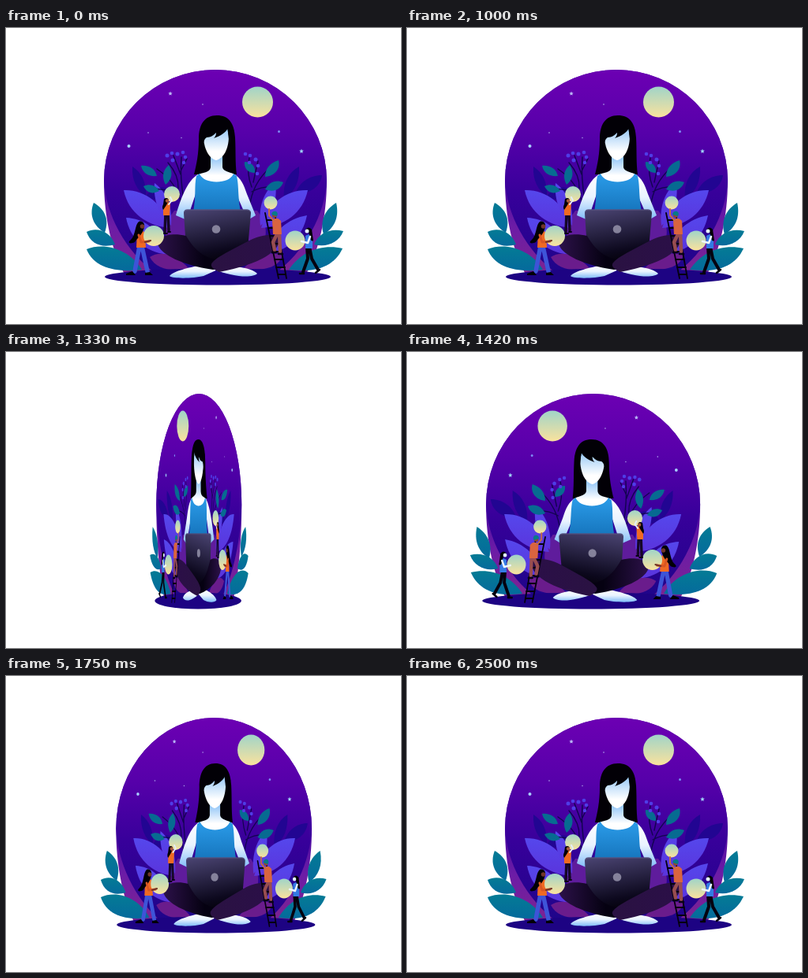
An HTML page that plays this animation: 500 by 376 pixels, repeating every 2580 ms.

```html
<!DOCTYPE html>
<html lang="en">
<head>
<meta charset="utf-8">
<title>Evening work</title>
<style>
  html, body { margin: 0; width: 100%; height: 100%; overflow: hidden; background: #fff; }
  svg { display: block; width: 100vw; height: 100vh; }
  .line { fill: none; stroke-linecap: round; stroke-linejoin: round; }
  .glow { fill: url(#moon); }
  .ink { fill: #020006; }
  .teal { fill: url(#teal); }
  .violet { fill: url(#violet); }
  .skin { fill: url(#skin); }
</style>
</head>
<body>
<svg viewBox="0 0 500 376">
  <defs>
    <linearGradient id="sky" gradientUnits="userSpaceOnUse" x1="0" y1="53" x2="0" y2="316">
      <stop offset="0" stop-color="#6c00b3"/><stop offset=".3" stop-color="#5700aa"/>
      <stop offset=".6" stop-color="#37009a"/><stop offset="1" stop-color="#1d0589"/>
    </linearGradient>
    <linearGradient id="rim" gradientUnits="userSpaceOnUse" x1="0" y1="194" x2="0" y2="310">
      <stop offset="0" stop-color="#4a0aa2"/><stop offset=".5" stop-color="#6c1ca6"/><stop offset="1" stop-color="#7c2392"/>
    </linearGradient>
    <linearGradient id="moon" x2="0" y2="1">
      <stop offset="0" stop-color="#a0d4c8"/><stop offset="1" stop-color="#fae29d"/>
    </linearGradient>
    <linearGradient id="teal" x2="0" y2="1">
      <stop offset="0" stop-color="#047b95"/><stop offset="1" stop-color="#056a9c"/>
    </linearGradient>
    <linearGradient id="violet" x2="0" y2="1">
      <stop offset="0" stop-color="#5547ec"/><stop offset="1" stop-color="#5a34dc"/>
    </linearGradient>
    <linearGradient id="skin" x2="0" y2="1">
      <stop offset="0" stop-color="#fff"/><stop offset=".5" stop-color="#e9f3ff"/><stop offset="1" stop-color="#7fbcf8"/>
    </linearGradient>
    <linearGradient id="neck" x2="0" y2="1">
      <stop offset=".1" stop-color="#8fc4f7"/><stop offset=".7" stop-color="#fff"/>
    </linearGradient>
    <linearGradient id="face" x2="0" y2="1">
      <stop offset="0" stop-color="#86bff5"/><stop offset=".75" stop-color="#fff"/>
    </linearGradient>
    <linearGradient id="top" x2="0" y2="1">
      <stop offset="0" stop-color="#2b9ce9"/><stop offset="1" stop-color="#1675bd"/>
    </linearGradient>
    <linearGradient id="case" x1=".2" x2=".4" y2="1">
      <stop offset="0" stop-color="#48426f"/><stop offset=".75" stop-color="#0c081d"/><stop offset="1" stop-color="#020006"/>
    </linearGradient>
    <linearGradient id="legL"><stop offset="0" stop-color="#2c1149"/><stop offset=".7" stop-color="#050111"/></linearGradient>
    <linearGradient id="legR"><stop offset="0" stop-color="#2a1242"/><stop offset="1" stop-color="#2b0f48"/></linearGradient>
    <clipPath id="ground"><path d="M90 40H440V315H90Z"/></clipPath>
  </defs>

  <g id="scene">
    <!-- sky -->
    <g clip-path="url(#ground)">
      <path d="M124 194A141 141 0 0 1 406 194C406 240 396 285 378 316H152C134 285 124 240 124 194Z" fill="url(#rim)"/>
      <path d="M124 194A141 141 0 0 1 406 194C404 235 380 285 335 316H195C150 285 126 235 124 194Z" fill="url(#sky)"/>
    </g>
    <circle class="glow" cx="318.500" cy="94" r="19.500"/>
    <g fill="#b9b6f5">
      <path d="M208 80.500l.8 1.700 1.800.2-1.300 1.300.3 1.900-1.600-.9-1.600.9.300-1.900-1.300-1.300 1.800-.2Z"/>
      <path d="M374 153.500l.8 1.900 2 .2-1.500 1.400.4 2-1.700-1-1.700 1 .4-2-1.500-1.400 2-.2Z" fill="#9fd0f8"/>
      <circle cx="155.500" cy="150" r="2" fill="#a9d0ff"/>
      <circle cx="345.500" cy="131.500" r="1.500" fill="#7d8df5"/>
      <circle cx="249" cy="97" r=".8"/><circle cx="180" cy="133" r=".8"/><circle cx="222" cy="139.500" r=".7"/>
    </g>

    <!-- plants -->
    <g fill="#220592">
      <path d="M160 176C172 184 178 196 177 214C166 206 159 194 160 176Z"/>
      <path d="M177 214C185 203 195 200 204 204C200 216 190 222 177 214Z"/>
      <path d="M371 176C372 194 366 208 352 217C350 198 357 184 371 176Z"/>
      <path d="M400 187C398 202 384 211 366 211C371 196 384 187 400 187Z"/>
    </g>
    <path d="M213 232C202 246 200 258 204 270H236V232ZM318 232C329 246 331 258 327 270H296V232Z" fill="#5f1c9c"/>
    <path class="violet" d="M149 206C175 205 199 222 208 254C180 252 155 236 149 206Z"/>
    <path class="violet" d="M188 197C202 208 211 224 209 251C195 240 186 220 188 197Z"/>
    <path class="violet" d="M152 241C174 242 194 254 204 288C176 284 157 268 152 241Z"/>
    <path class="violet" d="M382 206C355 205 332 222 323 254C352 252 376 235 382 206Z"/>
    <path class="violet" d="M341 195C327 208 319 226 322 251C337 240 344 220 341 195Z"/>
    <path class="violet" d="M381 238C357 242 337 258 328 288C356 283 375 267 381 238Z"/>
    <path d="M182 291C193 284 212 284 232 306C208 310 190 306 182 291ZM350 288C335 284 318 288 300 306C328 309 346 304 350 288Z" fill="#6a1c8c"/>
    <g class="line" stroke="#120450" stroke-width="1.400">
      <path d="M223 228Q218 197 191 179M220 210Q206 206 188 204M218 204Q219 187 205 171M225 218Q220 190 222 164M221 186L212 162M221 182L229 166"/>
      <path d="M308 230Q311 197 335 177M311 208Q326 200 341 202M311 202Q304 184 308 165M313 196Q316 182 319 169"/>
    </g>
    <g fill="#076b91">
      <path d="M171 175C181 174 189 179 191 188C181 189 173 185 171 175Z"/>
      <path d="M206 174C212 183 210 193 202 199C197 190 198 181 206 174Z"/>
      <path d="M174 201C182 197 190 200 194 207C185 212 178 209 174 201Z"/>
      <path d="M345 168C348 179 340 188 328 189C328 178 335 171 345 168Z"/>
      <path d="M351 196C347 206 338 209 328 205C333 196 341 192 351 196Z"/>
      <path d="M302 170C311 170 316 176 315 184C306 184 301 178 302 170Z"/>
    </g>
    <g fill="#4f3de6">
      <circle cx="204" cy="162" r="2.500"/><circle cx="210" cy="159" r="2.300"/><circle cx="217" cy="160" r="2.500"/>
      <circle cx="224" cy="158" r="2.300"/><circle cx="227" cy="164" r="2.300"/><circle cx="211" cy="168" r="2.500"/>
      <circle cx="225" cy="171" r="2.200"/><circle cx="303" cy="160" r="2.300"/><circle cx="309" cy="162" r="2.300"/>
      <circle cx="316" cy="167" r="2.500"/><circle cx="308" cy="171" r="2.300"/><circle cx="319" cy="175" r="2.300"/>
      <circle cx="318" cy="185" r="2.300"/>
    </g>
    <g class="teal">
      <path d="M111 222C125 230 131 243 125 260C110 251 105 237 111 222Z"/>
      <path d="M102 259C116 252 132 259 138 275C121 280 107 274 102 259Z"/>
      <path d="M102 281C125 272 156 281 172 307C141 311 111 305 102 281Z"/>
      <path d="M418 222C422 240 416 254 402 262C397 246 403 231 418 222Z"/>
      <path d="M427 258C421 273 406 279 390 275C396 260 411 254 427 258Z"/>
      <path d="M426 280C415 304 391 311 358 307C374 283 401 274 426 280Z"/>
    </g>
    <ellipse cx="268" cy="316" rx="143" ry="10.500" fill="#1d0383"/>

    <!-- seated woman -->
    <path class="ink" d="M267 111C251 111 244 123 244 141C244 160 241 174 238 186H292C290 171 291 157 290 139C289 121 282 111 267 111Z"/>
    <path class="skin" d="M243 186H289C297 190 301 199 305 211L316 238L306 244L291 210L288 194H245L240 211L229 244L215 238C221 218 229 194 243 186Z"/>
    <path d="M259 160H274V177C275 183 286 183 291 187L284 199H249L241 187C249 183 258 184 259 177Z" fill="url(#neck)"/>
    <path d="M241 188L245 185C250 199 283 199 288 185L292 188C295 201 293 211 297 233H237C241 213 238 201 241 188Z" fill="url(#top)"/>
    <path d="M250 137C250 153 257 166 266 168C275 166 282 154 282 137L279 123H254Z" fill="url(#face)"/>
    <path class="ink" d="M247 150C251 147 250 141 254 139C259 139 263 136 266 133C266 136 265 138 263 140C272 137 279 132 281 127C281 138 282 144 286 154L289 132L279 116H258L246 130Z"/>
    <path d="M229 230.500H305Q310 230.500 310 235L306 280L290 303H243L228 280L225 235Q225 230.500 229 230.500Z" fill="url(#case)"/>
    <path class="line" d="M226 233Q227 231 230 231H305Q308 231 309 233" stroke="#625e8b" stroke-width=".8"/>
    <circle cx="266" cy="255.500" r="5.300" fill="#85829b"/>
    <path class="skin" d="M246 301C231 305 213 308 207 315C212 319 238 318 250 315L270 306ZM281 301C295 304 312 305 318 312C313 317 291 318 262 306Z"/>
    <path d="M228 264C206 259 188 266 193 277C198 288 222 301 262 307L277 303L268 294C254 293 240 285 228 264Z" fill="url(#legL)"/>
    <path d="M308 270C323 262 341 261 347 265C348 284 321 300 270 310C263 307 259 303 260 300C263 294 273 288 308 270Z" fill="url(#legR)"/>

    <!-- helper with the large globe -->
    <path class="line" d="M169 277L163 309M172 277L179 309" stroke="#3e54d8" stroke-width="5.500"/>
    <path class="ink" d="M152 312L160 309L164 314H152ZM176 311L182 310L186 314H176Z"/>
    <path d="M166 259Q171 255 176 260L177 279H165Z" fill="#f06a23"/>
    <path class="ink" d="M168 246C174 244 177 250 174 256C172 263 167 266 163 272C157 275 153 273 158 269C164 264 163 250 168 246Z"/>
    <circle cx="172.500" cy="252" r="2.800" fill="#713629"/>
    <circle class="glow" cx="187" cy="264" r="13"/>
    <path class="line" d="M168 263L171 272L181 271" stroke="#d95624" stroke-width="3"/>
    <path class="line" d="M176 272L183 270" stroke="#713629" stroke-width="2.200"/>

    <!-- helper beside the laptop -->
    <circle class="glow" cx="210" cy="211" r="10"/>
    <path class="line" d="M202 235L201 259M205 235L206 257" stroke="#150728" stroke-width="3.500"/>
    <path class="line" d="M200 261H204M205 259H208" stroke="#090315" stroke-width="2"/>
    <path d="M199 224Q203 219 208 222L207 238H199Z" fill="#f06a23"/>
    <path class="ink" d="M200 217Q205 214 206 219L203 225L199 231Q197 228 199 224Z"/>
    <circle cx="204" cy="219.500" r="2.200" fill="#a7593d"/>
    <path class="line" d="M206 224L210 219L208 215" stroke="#e3eefb" stroke-width="2"/>

    <!-- helper on the ladder -->
    <g class="line" stroke="#05010f" stroke-width="1.800">
      <path d="M328 235L345 318M340 235L355 318"/>
      <path d="M330 244H341M332 254H343M334 264H345M336 274H347M338 284H349M340 294H351M342 304H353M344 313H354"/>
    </g>
    <circle class="glow" cx="335" cy="222" r="8.500"/>
    <path class="line" d="M344 260L338 272L340 282M346 260L347 284" stroke="#984d50" stroke-width="4.500"/>
    <path class="line" d="M337 285H342M345 287H350" stroke="#090315" stroke-width="2.500"/>
    <path d="M337 244Q343 239 348 245L349 262H338Z" fill="#d9643f"/>
    <circle cx="340" cy="238" r="3" fill="#8a4637"/>
    <path d="M336 237Q337 232 342 233Q345 235 343 239Z" fill="#087a86"/>
    <path class="line" d="M339 245L333 238L333 230" stroke="#c46b45" stroke-width="2"/>

    <!-- helper on the right -->
    <path class="line" d="M381 278L382 293L376 310M384 278L387 293L395 307" stroke="#05010f" stroke-width="4"/>
    <path class="line" d="M372 312H377M392 311L397 307" stroke="#05010f" stroke-width="2.500"/>
    <path d="M379 264Q384 260 388 265L388 280H379Z" fill="#347ae3"/>
    <path class="ink" d="M379 256Q383 251 387 256L389 270Q386 272 385 266L383 259Z"/>
    <circle cx="381" cy="258" r="2.500" fill="#e3f0ff"/>
    <circle class="glow" cx="366" cy="270" r="12.500"/>
    <path class="line" d="M385 265L382 273L374 271" stroke="#edf5ff" stroke-width="2.600"/>
  </g>
</svg>
<script>
  const scene = document.getElementById("scene");
  const loop = 2580, fps = 12;
  // [tick, degrees]: one full turn about the vertical centre line
  const keys = [[11, 0], [14, 25.8], [17, 164], [19, 270.3], [23, 360]];

  function slope(i) {
    const a = keys[i - 1], b = keys[i + 1];
    return a && b ? (b[1] - a[1]) / (b[0] - a[0]) : 0;
  }

  function angle(tick) {
    const i = keys.findIndex(key => tick < key[0]);
    if (i < 1) return 0;
    const [t0, a] = keys[i - 1], [t1, b] = keys[i];
    const d = t1 - t0, u = (tick - t0) / d, v = 1 - u;
    return a * v * v * (1 + 2 * u) + b * u * u * (3 - 2 * u)
      + d * u * v * (slope(i - 1) * v - slope(i) * u);
  }

  function draw() {
    const time = performance.now() % loop;
    const tick = Math.floor((time + 5) * fps / 1000);
    const width = Math.cos(angle(tick) * Math.PI / 180);
    scene.setAttribute("transform", `translate(250 0) scale(${width} 1) translate(-250 0)`);
    requestAnimationFrame(draw);
  }
  draw();
</script>
</body>
</html>
```
